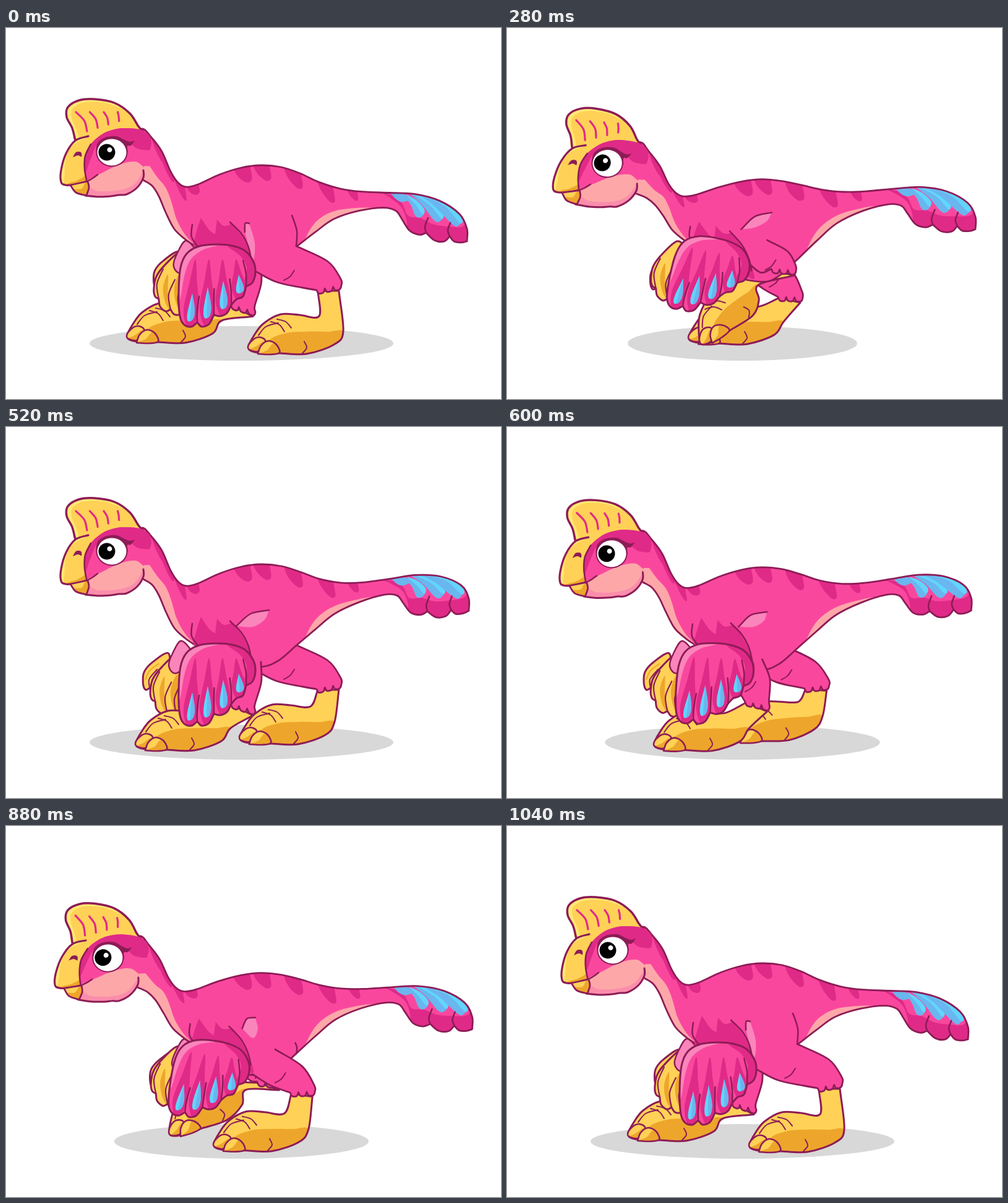
An HTML page with a canvas for the animation above (1.08 s loop, 800 by 600 pixels).

```html
<!DOCTYPE html>
<html lang="en">
<head>
<meta charset="utf-8">
<title>Walking dinosaur</title>
<style>
html, body { margin: 0; width: 100%; height: 100%; overflow: hidden; background: #fff; }
canvas { display: block; }
</style>
</head>
<body>
<canvas id="stage" width="800" height="600"></canvas>
<script>
const ctx = document.getElementById('stage').getContext('2d');
const LINE = '#8d1c56', PINK = '#fa479e', DARK = '#e02a87', PALE = '#fa85bb';
const GOLD = '#ffd157', AMBER = '#eda62b', LEMON = '#ffe873';
const SALMON = '#fea7a9', ROSE = '#fa8dab', SKY = '#62d5fd', BLUE = '#6ab6ee';
const LOOP = 1080, STRIDE = 1040, STEP = 40;

// ---------- geometry ----------
const mix = (a, b, k) => a + (b - a) * k;
function smooth(a, b, x) {
  const k = Math.min(1, Math.max(0, (x - a) / (b - a)));
  return k * k * (3 - 2 * k);
}
// "x,y x,y!" : smooth points, "!" marks a corner
const pts = s => s.split(' ').map(w => {
  const [x, y] = w.split(',').map(parseFloat);
  return { x, y, c: w.endsWith('!') };
});
const point = (x, y, c) => ({ x, y, c });
const add = (p, x, y, c) => point(p.x + x, p.y + y, c);
const between = (a, b, k) => point(mix(a.x, b.x, k), mix(a.y, b.y, k));
const corner = p => point(p.x, p.y, true);
const oval = (x, y, rx, ry) => Array.from({ length: 10 }, (_, i) =>
  point(x + rx * Math.cos(i * Math.PI / 5), y + ry * Math.sin(i * Math.PI / 5)));

// ---------- motion ----------
// Whole-body rhythm: bob twice per stride, sway and tail lift once
function rhythm(t) {
  const a = 2 * Math.PI * t / STRIDE;
  return { bob: Math.sin(a) ** 2, sway: Math.sin(a), lift: (1 + Math.cos(a - 3.44)) / 2 };
}

// Bends resting coordinates of head, body and tail into the current pose
function bender({ bob, lift }) {
  return ({ x, y, c }) => {
    const chest = smooth(420, 290, x);
    const tail = Math.max(0, (x - 460) / 286);
    const sag = 23 * Math.max(0, 1 - tail) ** 3 * (1 - chest * smooth(200, 350, y));
    let dx = -5 * bob * chest + (11 * bob + 3 * lift) * tail;
    let dy = sag * bob - 50 * lift * tail ** 1.4;
    const body = smooth(215, 260, x);
    dx = mix(bob * (-9 - .12 * (y - 201)), dx, body);
    dy = mix(bob * (18 + .084 * (x - 171)), dy, body);
    return point(x + dx, y + dy, c);
  };
}

// Stance carries the foot back in a line, swing brings it forward in an arc
function stride(leg, t) {
  const u = (t / STRIDE + leg.phase) % 1;
  const swing = Math.max(0, u * 2 - 1);
  const along = swing ? 1 - swing : u * 2;
  const raise = Math.sin(Math.PI * swing) ** 3;
  const reach = swing ? 1 - swing ** 1.3 : along;
  const ball = point(leg.x + 182 * reach, leg.y + 4 * reach - 36 * raise);
  const cos = Math.cos(.61 * raise), sin = -Math.sin(.61 * raise);
  const at = p => point(ball.x + p.x * cos - p.y * sin, ball.y + p.x * sin + p.y * cos, p.c);
  const cuff = point(382 + 139 * along, 458 - 33 * along - 48 * raise);
  return { along, raise, at, cuff, slope: .5 * (1 - along) };
}
const near = { phase: .5, x: 260, y: 523 };
const far = { phase: 0, x: 246, y: 509 };

// ---------- drawing ----------
const still = p => p;
let map = still;

function path(src, open) {
  const p = (typeof src === 'string' ? pts(src) : src).map(map), n = p.length;
  const get = i => open ? p[Math.min(n - 1, Math.max(0, i))] : p[(i + n) % n];
  const handle = (i, dir) => {
    const q = get(i), to = get(i + dir), from = get(i - dir);
    return q.c ? [mix(q.x, to.x, .33), mix(q.y, to.y, .33)]
      : [q.x + (to.x - from.x) / 6, q.y + (to.y - from.y) / 6];
  };
  const out = new Path2D();
  out.moveTo(p[0].x, p[0].y);
  for (let i = 0; i < (open ? n - 1 : n); i++) {
    const q = get(i + 1);
    out.bezierCurveTo(...handle(i, 1), ...handle(i + 1, -1), q.x, q.y);
  }
  if (!open) out.closePath();
  return out;
}
function fill(src, color) {
  ctx.fillStyle = color;
  ctx.fill(path(src));
}
function line(src, width = 2.5, color = LINE, open = true) {
  ctx.lineWidth = width;
  ctx.strokeStyle = color;
  ctx.stroke(path(src, open));
}
const ring = (src, width = 3) => line(src, width, LINE, false);
function shape(src, color, width) {
  fill(src, color);
  ring(src, width);
}
function inside(src, paint) {
  ctx.save();
  ctx.clip(path(src));
  paint();
  ctx.restore();
}
function moved(x, y, paint) {
  ctx.save();
  ctx.translate(x, y);
  paint();
  ctx.restore();
}

function drawShadow(t) {
  const u = t % (STRIDE / 2);
  const shrink = u < 240 ? 70 * u / 240 : (520 - u) / 4;
  ctx.fillStyle = '#d8d8d8';
  ctx.beginPath();
  ctx.ellipse(380.5, 510, 245.5 - shrink, 28, 0, 0, 2 * Math.PI);
  ctx.fill();
}

function drawFoot({ raise, at, cuff, slope }) {
  const local = s => pts(s).map(at);
  const heel = at(point(88 - 22 * raise, -15)), back = at(point(103 - 24 * raise, -36));
  const front = at(point(64 - 14 * raise, -61));
  const outline = [add(cuff, -17, -17 * slope, true), front,
    ...local('32,-63 2,-64 -26,-49 -41,-30 -50,-12 -44,-4 -15,0 0,-1 44,0'),
    heel, back, add(cuff, 17, 17 * slope, true)];
  fill(outline, GOLD);
  inside(outline, () => fill([...local('-20,-18 8,-33 44,-36'), between(heel, front, .45), back,
    add(heel, 14, 12), ...local('44,20 -20,20')], AMBER));
  line(local('-34,-30 -22,-44 -2,-50'), 2);
  line(local('-14,-52 0,-47 8,-36'), 2);
  line(local('-4,-56 10,-52 19,-42'), 2);
  line(local('40,-20 44,-10 37,-1'), 2);
  ring(outline);
  const small = local('-51,-10 -46,-20 -34,-27 -23,-22 -27,-10 -34,-4 -45,-5');
  const big = local('-35,0! -30,-13 -18,-21 -5,-15 0,-2 -15,1');
  for (const [toe, shade] of [[small, '-52,-4 -38,-12 -24,-20 -20,0'], [big, '-36,2 -20,-6 -10,-17 4,-14 4,6']]) {
    fill(toe, GOLD);
    inside(toe, () => fill(local(shade), AMBER));
    ring(toe, 2.6);
  }
}

function drawThigh({ along, raise, cuff, slope }) {
  const rump = point(412 + 58 * along ** 2.5, 380 - 27 * along - 25 * raise, true);
  const b = add(cuff, 21, 21 * slope - 9), c = add(cuff, -19, -19 * slope - 1);
  const knee = add(between(rump, b, .5), 5 + 9 * along, -7);
  const front = add(c, -6 - 55 * along ** 2, -12 + 18 * raise);
  const root = add(front, -10 - 27 * along, -18, true);
  const edge = [rump, knee, add(b, -1, -10), b];
  for (let i = 0; i < 3; i++) {
    for (const k of [.2, .75]) edge.push(add(between(b, c, (i + k) / 3), 0, 6));
    edge.push(corner(between(b, c, (i + 1) / 3)));
  }
  edge.push(front, root);
  fill([...edge, point(398, 360), point(425, 340)], PINK);
  line(edge, 2.8);
  line([add(front, 8, -4), add(front, 18, -10), add(front, 25, -20)], 2);
}

function drawHand({ bob, sway, lift }) {
  moved(-18 * lift, 4 * lift, () => {
    shape('280,362 255,376 241,392 239,410 243,421 250,418! 255,426 265,420 280,395', GOLD);
    line('250,418 249,404 262,388', 2);
    line('243,404 250,390 264,379', 2, AMBER);
  });
  moved(-4 * bob - 6 * lift, -16 * bob - 4 * sway + 6 * lift, () => {
    const hand = '282,362 258,382 243,402 239,422 241,434 247,438! 249,450 258,458 266,455! 272,463 282,462 294,440 294,380';
    fill(hand, GOLD);
    inside(hand, () => {
      fill('262,398 254,420 258,445 268,458 262,430', AMBER);
      fill('282,395 272,420 276,448 290,470 296,400', AMBER);
    });
    ring(hand);
    for (const [x, y] of [[247, 438], [266, 455], [281, 458]])
      line([point(x, y), point(x - 3, y - 24), point(x + 7, y - 48)], 2.2);
  });
  moved(-8 * lift, 2 * lift, () => shape('292,344 278,362 271,385 284,396 310,370', PALE, 2.5));
}

const BODY = '219,163 235,177 252,200 266,232 278,250 291,257 310,253 345,237 380,226 412,222 445,225 475,235 505,249 '
  + '540,260 575,265 620,267 660,269 700,280 733,302 745,326 745,346! 736,348 724,346 717,338! 708,346 692,344 '
  + '679,332! 668,335 652,328 640,310 630,296 610,291 570,296 530,309 500,330 470,353! 440,378 410,388 350,385 '
  + '308,354! 290,342 272,325 258,298 247,272 236,255 222,246! 195,225 200,185';
const NECK_STRIPES = [[246, 190], [261, 220], [281, 250]];
const BACK_STRIPES = [[383, 225], [414, 221], [465, 232], [517, 252]];

// A leaf hanging from the back, sheared along its slope
function stripe(x, y, slope, size) {
  fill(pts('-15,-4 -9,14 6,27 15,24 14,10 8,-6').map(p =>
    point(x + p.x * size, y + (p.y + slope * p.x) * size)), DARK);
}

function drawBody() {
  fill(BODY, PINK);
  inside(BODY, () => {
    NECK_STRIPES.forEach(([x, y]) => stripe(x, y, 1.2, .7));
    BACK_STRIPES.forEach(([x, y]) => stripe(x, y, .0045 * (x - 414), .95));
    stripe(303, 254, -.4, .65);
    stripe(560, 262, .2, .6);
    fill('216,226 232,223! 245,242 258,258 267,280 276,310 290,335 308,353! 270,345 240,290 215,250', SALMON);
    fill('480,348! 494,322 510,306 535,295 570,291 594,291! 560,310 520,330', SALMON);
    fill('606,266! 625,272 640,284 650,304 670,308 690,318 715,322 738,322 752,305 756,356 690,356 645,332! 648,316 640,292 622,276', DARK);
    fill('622,268! 640,269 652,278 640,282 630,277', BLUE);
    for (let i = 0; i < 3; i++) {
      const x = 640 + 12 * i, w = 36 + 18 * i, y = 306 + 7 * i;
      const tip = point(x + w - 4, y);
      fill([point(x, 268, true), point(x + w * .6, 278 + i), point(x + w, y - 12), tip,
        add(tip, -10, -1), point(x + w * .38, 286 + i)], BLUE);
      fill([point(x + 6, 269, true), point(x + w * .6, 278 + i), point(x + w, y - 12), add(tip, 1, -4),
        point(x + w * .62, 287 + i)], SKY);
    }
  });
  ring(BODY, 2.8);
  line('679,332 677,322 682,308', 2.6);
  line('717,338 714,328 718,316', 2.6);
}

const CREST = '112,182 107,162 98,144 100,128 118,117 143,115 175,121 200,138 214,159 221,167! 195,164 165,170 145,185';
const BEAK = '155,170 133,175 112,182 97,203 89,230 89,249 96,254 112,253 131,248! 133,230 130,212 140,195';
const FACE = '131,271 131,249! 127,228 128,207 137,188 152,174 168,166 190,162 221,166 235,185 222,228 222,240 212,258 195,269 170,271';

function drawHead() {
  const chin = '104,254! 113,266 130,271! 134,258 132,248!';
  fill(CREST, GOLD);
  inside(CREST, () => fill('95,110 180,115 195,132 160,121 128,120 108,130 106,145 114,165 118,185 90,150', LEMON));
  for (let i = 0; i < 4; i++) {
    const x = 113 + 22.5 * i, slant = 18 - 5.3 * i, long = 31 - 5.5 * i;
    line([point(x, 136), point(x + slant * .75, 136 + long * .45), point(x + slant, 136 + long)], 3.2, DARK);
  }
  line('112,182 107,162 98,144 100,128 118,117 143,115 175,121 200,138 214,159 222,168', 3.5);

  fill(BEAK, GOLD);
  inside(BEAK, () => {
    fill('140,172 108,190 96,215 94,250 84,248 84,215 105,180', LEMON);
    fill('90,252 112,248 126,240 140,236 138,258 90,258', AMBER);
    fill('150,165 122,184 102,208 94,250 112,246 127,238 140,200', GOLD);
  });
  line('133,175 112,182 97,203 89,230 89,249 96,254 112,253 131,248', 3.2);

  fill(FACE, PINK);
  inside(FACE, () => {
    fill('120,205 126,238 136,214 146,190 158,180 180,176 200,186 215,196 240,194 240,160 180,155 130,165', DARK);
    fill('125,249! 152,236 180,222 205,216 218,221 230,240 205,285 120,285', SALMON);
    fill('128,258 150,264 185,262 208,252 228,228 235,280 120,290', ROSE);
  });
  line('222,230 222,242 212,258 195,269 183,270 170,272 150,273 128,271', 3);
  line('131,250 127,228 128,207 137,188', 2.6);
  fill(chin, GOLD);
  inside(chin, () => fill('108,262 122,260 129,250 140,250 134,275', AMBER));
  ring(chin, 2.8);
  fill('108,209! 113,201 121,201 122,208 116,206', LINE);
  line('131,248 140,243 148,237', 2.5);

  fill('146,200 148,186 160,177 178,175 194,182 201,184 208,182! 202,190 196,191 197,202 190,190 172,181 156,185', LINE);
  shape(oval(171, 201, 24.5, 22.5), '#fff', 2);
  fill(oval(163, 201, 13.5, 13.5), '#000');
  fill(oval(167.5, 197, 4, 4), '#fff');
}

// Skin fold that opens as the thigh swings forward
function drawFold({ along, raise }) {
  const open = 1 - along;
  const a = point(386 - 14 * open, 330 - 8 * open, true);
  const tip = point(393 + 32 * open + 18 * raise, 316 - 20 * open - 7 * raise, true);
  const low = point(399, 375 - 52 * Math.min(1, 2 * open));
  const rim = [a, add(between(a, tip, .5), -3, -7), tip];
  fill([...rim, add(between(tip, low, .5), 6, 2), low], PALE);
  line(rim, 2.5);
}

function drawShoulder({ along }) {
  const crease = 50 * smooth(.5, 1, along);
  if (crease) line([point(470 - crease * .16, 353 - crease), point(470, 353 - crease / 2), point(469, 353)], 2.5);
  fill('303,350 310,322 315,307! 328,326 338,334! 341,310! 352,320 365,317! 380,335 392,358 398,385 350,362 308,354', DARK);
  line('301,318 300,338 312,356', 2.5);
  line('362,314 380,332 391,352 396,372', 2.5);
}

const WING = '340,350 312,353 292,365 282,388 279,430 281,466 288,480 300,483 309,476! 316,483 328,479 336,464! '
  + '346,466 357,461 364,448! 372,439 383,434 388,418! 398,412 403,396 400,378 386,360 365,352';

function drawWing({ bob, sway }) {
  ctx.save();
  ctx.translate(388 - 8 * bob - 2 * (sway < 0), 375 - 3 * sway);
  ctx.rotate(.2 * bob);
  ctx.scale(1, 1 - .06 * bob);
  ctx.translate(-388, -375);
  const feathers = Array.from({ length: 4 }, (_, i) =>
    ({ i, top: point(306 + 22 * i, 374), tip: point(297 + 27 * i, 480 - 5 * i * i) }));
  fill(WING, PINK);
  inside(WING, () => {
    fill('345,350 318,359 298,375 288,402 281,440 272,440 275,385 295,350', PALE);
    for (const { top, tip } of feathers) {
      const mid = between(top, tip, .35), low = between(top, tip, .8);
      fill([top, add(mid, 6, 0), add(low, 12, 0), add(tip, 0, 10), add(low, -12, 0), add(mid, -6, 0)], DARK);
    }
    fill('358,352 378,368 389,387 386,415 410,425 410,370 385,348', DARK);
  });
  for (const { i, tip } of feathers) {
    const top = point(301 + 25 * i, 429 - 10 * i, true), end = add(tip, 1, -6);
    const mid = between(top, end, .6);
    const drop = [top, add(mid, 6, 0), add(end, 4, -3), add(end, -4, 0), add(mid, -6, 5)];
    fill(drop, SKY);
    inside(drop, () => fill([top, add(mid, 9, 0), add(end, 8, 2), add(end, 0, 2)], BLUE));
  }
  ring(WING, 3);
  for (const [x, y] of [[309, 476], [336, 464], [364, 448], [388, 418]])
    line([point(x, y), point(x, y - 20), point(x + (340 - x) * .1, y - 42)], 2.4);
  ctx.restore();
}

function draw(t) {
  const beat = rhythm(t), bend = bender(beat);
  const nearLeg = stride(near, t), farLeg = stride(far, t);
  ctx.fillStyle = '#fff';
  ctx.fillRect(0, 0, 800, 600);
  map = still;
  drawShadow(t);
  drawFoot(farLeg);
  drawThigh(farLeg);
  drawHand(beat);
  drawFoot(nearLeg);
  map = bend;
  drawBody();
  drawHead();
  map = still;
  drawThigh(nearLeg);
  drawFold(nearLeg);
  map = bend;
  drawShoulder(nearLeg);
  map = still;
  drawWing(beat);
}

ctx.lineJoin = ctx.lineCap = 'round';
const start = performance.now();
function tick() {
  const t = Math.floor((performance.now() - start) % LOOP / STEP) * STEP;
  draw(t % STRIDE);
  requestAnimationFrame(tick);
}
tick();
</script>
</body>
</html>
```
